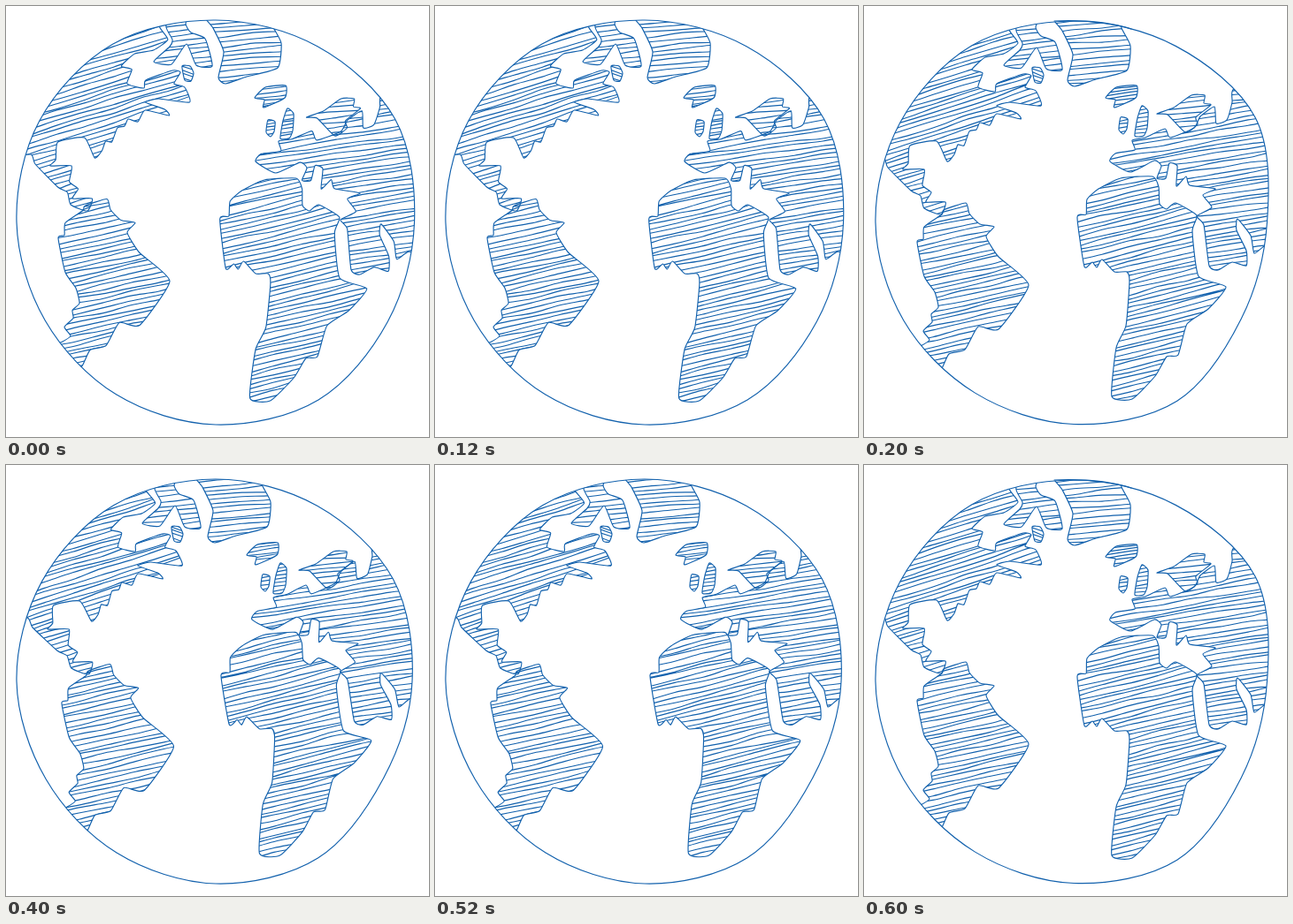
Write an HTML page that moves like this. It is 478 by 488 pixels and loops after 0.8 s.

```html
<!DOCTYPE html>
<html lang="en">
<head>
<meta charset="utf-8">
<title>Sketched globe</title>
<style>
html, body { margin: 0; width: 100%; height: 100%; overflow: hidden; background: #fff; }
svg { display: block; }
path { fill: none; stroke: #1261ad; stroke-width: 1.15; stroke-linejoin: round; stroke-linecap: round; }
clipPath path { stroke: none; }
</style>
</head>
<body>
<svg id="stage" width="478" height="488" viewBox="0 0 478 488"></svg>
<script>
const order = [0, 1, 2, 1];
const loop = 800;
const stage = document.getElementById('stage');
const defs = add(stage, 'defs', {});

function add(parent, tag, attrs) {
  const el = document.createElementNS('http://www.w3.org/2000/svg', tag);
  for (const key in attrs) el.setAttribute(key, attrs[key]);
  return parent.appendChild(el);
}

function random(seed) {
  return () => {
    seed = (seed * 16807) % 2147483647;
    return seed / 2147483647;
  };
}

// A curve through all the points; bend 1/6 is fully round, 0 is straight.
function curve(pts, bend, closed) {
  const n = pts.length;
  const at = i => closed ? pts[(i + n) % n] : pts[Math.max(0, Math.min(n - 1, i))];
  const handle = (p, from, to, k) => p.map((v, j) => (v + (to[j] - from[j]) * k).toFixed(1));
  let d = 'M' + pts[0];
  for (let i = 0; i < (closed ? n : n - 1); i++) {
    const [a, b, c, e] = [at(i - 1), at(i), at(i + 1), at(i + 2)];
    d += 'C' + [handle(b, a, c, bend), handle(c, b, e, -bend), c].join(' ');
  }
  return d + (closed ? 'Z' : '');
}

function hatch(pts, slope, rnd) {
  const xs = pts.map(p => p[0]), ys = pts.map(p => p[1]);
  const left = Math.min(...xs) - 4, right = Math.max(...xs) + 4;
  const reach = Math.abs(slope) * (right - left) / 2 + 8;
  const mid = (left + right) / 2;
  const end = Math.max(...ys) + reach;
  const gap = right - left < 50 ? 4 : 5.3;
  let d = '';
  for (let y = Math.min(...ys) - reach; y < end; y += gap * (.8 + rnd() * .4)) {
    const tilt = slope + (rnd() - .5) * .05;
    const line = [];
    for (let x = left; x < right + 32; x += 32) {
      line.push([x, +(y + tilt * (x - mid) + (rnd() - .5) * 2.6).toFixed(1)]);
    }
    d += curve(line, 1 / 6, false);
  }
  return d;
}

function clip(id, d) {
  add(add(defs, 'clipPath', { id }), 'path', { d });
  return `url(#${id})`;
}

// One pose: the rim as radii every 30 degrees from the right, clockwise.
function makePose(radii, index) {
  const group = add(stage, 'g', { opacity: 0 });
  const rim = curve(radii.map((r, i) => {
    const a = i * Math.PI / 6;
    return [237 + r * Math.cos(a), 245 + r * Math.sin(a)];
  }), 1 / 6, true);
  const land = add(group, 'g', { 'clip-path': clip('rim' + index, rim) });
  add(group, 'path', { d: rim });
  if (index === 1) add(group, 'path', { d: 'M215 17Q268 15 302 26' });
  const steps = [...order, order[0]].map((shown, i) => ({
    offset: i / order.length,
    opacity: shown === index ? 1 : 0,
    easing: 'steps(1, end)'
  }));
  group.animate(steps, { duration: loop, iterations: Infinity });
  return land;
}

const lands = [
  [224.5, 224.5, 232, 229, 225, 222.5, 225, 230, 233, 229, 230, 234],
  [218.5, 218.5, 233.5, 228.5, 223, 222, 224, 226.4, 231, 228, 230.5, 237],
  [222, 219, 231, 229, 224, 221.5, 225, 226.7, 230.3, 229, 229.5, 231.5]
].map(makePose);

// Outline in the middle pose, then how it leans in the first and last: dx, dy, dx per y, dy per x.
let count = 0;
function draw(slope, first, last, outline) {
  const n = outline.split(' ').map(Number);
  const base = n.filter((_, i) => i % 2 === 0).map((x, i) => [x, n[i * 2 + 1]]);
  const id = ++count;
  [first, [0, 0], last].forEach(([dx, dy, lean = 0, tip = 0], index) => {
    const pts = base.map(([x, y]) => [x + dx + lean * (y - 240), y + dy + tip * (x - 240)]);
    const d = curve(pts, .09, true);
    const fill = add(lands[index], 'g', { 'clip-path': clip(`land${id}-${index}`, d) });
    add(fill, 'path', { d: hatch(pts, slope, random(977 + index * 131 + id * 37)) });
    add(lands[index], 'path', { d });
  });
}

// North America
draw(-.31, [4.9, -4, -.02], [6.5, 1, .06],
  '163 4 164 27 174 42 158 54 137 58 122 72 134 76 129 92 148 97 150 88 180 77 189 79 182 92 194 96 200 113 165 109 150 113 172 121 177 128 150 122 142 135 131 132 127 140 119 142 113 158 106 157 102 168 94 176 82 153 52 158 50 178 44 185 68 185 66 203 76 211 70 222 92 222 87 236 68 229 64 215 53 209 27 183 22 172 -9 165 -9 4');
// Arctic islands
draw(-.12, [9, -4], [-4, -1],
  '174 4 172 28 179 42 176 50 158 67 178 70 195 47 206 71 224 72 216 41 200 34 194 24 200 4');
draw(.35, [9, -2], [-3, 0], '190 70 199 70 203 78 200 87 193 86');
// Greenland
draw(-.09, [10, -3], [-2, -3],
  '209 4 224 28 236 55 230 84 238 91 262 83 297 73 301 45 291 25 287 4');
// Iceland, Ireland, Britain
draw(-.12, [8, 0], [-1, -2], '273 104 285 92 308 90 307 104 283 115 284 106');
draw(-.15, [6, 3], [0, -2], '290 126 298 128 297 139 293 145 288 140');
draw(-.15, [4, 3], [-4, -2], '309 127 314 113 321 119 320 138 316 147 306 147');
// Scandinavia
draw(-.1, [8.5, 4], [0, -3],
  '331 122 350 115 370 101 385 101 384 110 392 112 375 126 377 134 363 143 343 123');
// Europe and Asia
draw(-.16, [1.9, -1.4, -.035, .04], [1.8, 0, .03, -.03],
  '418 94 416 109 410 129 398 133 396 114 380 125 373 138 346 149 340 139 318 149 303 152 306 163 284 167 278 176 301 188 328 175 336 181 331 195 341 195 345 178 354 181 353 204 364 193 368 203 397 207 383 214 393 228 376 238 384 248 390 294 400 299 416 290 432 294 432 277 421 254 422 241 437 260 441 280 454 271 482 268 484 180 465 94');
// Africa
draw(-.24, [.7, 2, -.025], [2, -1, .022, -.03],
  '251 236 252 219 265 207 290 195 326 193 333 205 334 224 342 230 352 223 376 237 371 255 378 306 409 318 389 343 365 360 355 395 342 397 329 419 303 445 280 442 285 387 296 362 300 312 297 301 283 301 269 287 263 296 258 290 249 295 241 239');
// South America
draw(-.22, [-1, -4.5], [2.6, 2.5, .012],
  '90 231 115 223 119 235 131 247 147 250 138 261 152 284 186 316 152 366 129 363 114 389 96 394 87 412 76 414 50 391 64 385 74 378 67 368 77 358 76 349 84 341 80 324 68 306 60 267 67 264 68 250 88 236');

// The rims stay above the land.
lands.forEach(land => land.parentNode.prepend(land));
</script>
</body>
</html>
```
